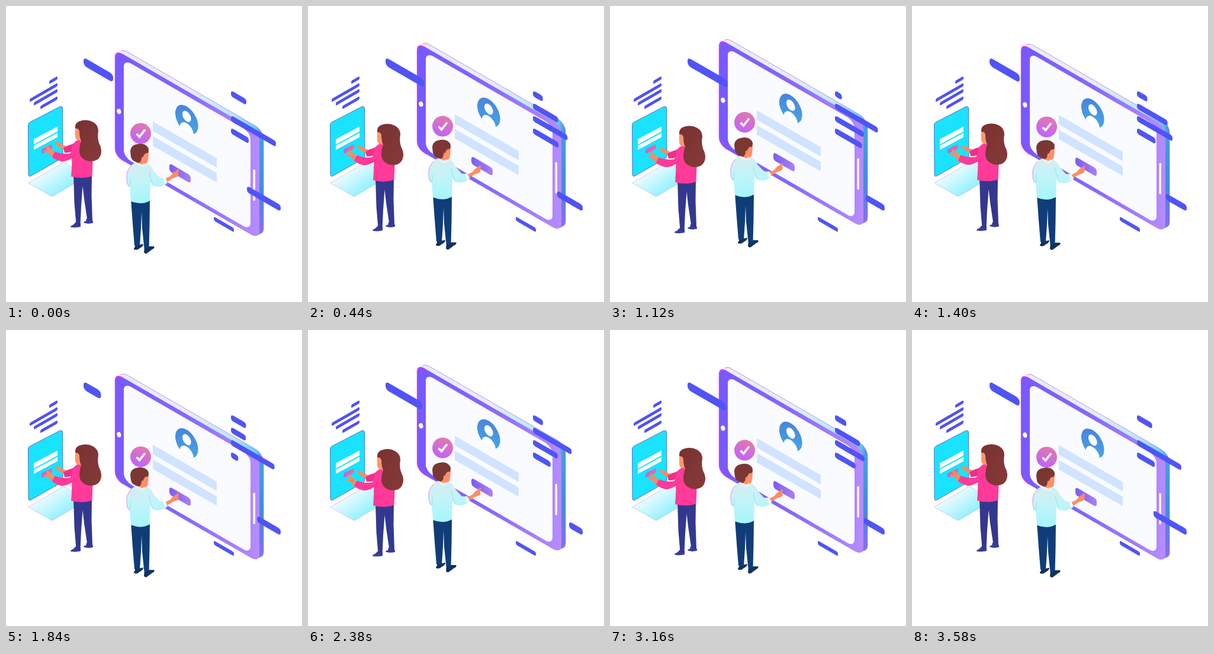
Write an HTML page that moves like this. It is 500 px wide and 500 px high and loops after 3600 ms.

```html
<!DOCTYPE html>
<html lang="en">
<head>
<meta charset="utf-8">
<title>Isometric sign-in</title>
<style>
html, body { margin: 0; width: 100%; height: 100%; overflow: hidden; background: #fff; }
svg { display: block; width: 100vw; height: 100vh; }
</style>
</head>
<body>
<svg viewBox="0 0 500 500">
  <defs>
    <linearGradient id="face"><stop offset="0" stop-color="#7858ff"/><stop offset=".5" stop-color="#8667ff"/><stop offset="1" stop-color="#b78cff"/></linearGradient>
    <linearGradient id="rim" gradientUnits="userSpaceOnUse" x1="184" x2="435" y1="0" y2="0">
      <stop offset="0" stop-color="#e9edf5"/><stop offset=".5" stop-color="#e4eef7"/><stop offset=".8" stop-color="#b5e9f5"/><stop offset=".95" stop-color="#62cdee"/><stop offset="1" stop-color="#4586dc"/>
    </linearGradient>
    <linearGradient id="edge" x2="0" y2="1"><stop offset="0" stop-color="#43a2e0"/><stop offset=".55" stop-color="#458bdc"/><stop offset="1" stop-color="#8a6cf2"/></linearGradient>
    <linearGradient id="button"><stop offset="0" stop-color="#7b5cf5"/><stop offset="1" stop-color="#ac80f0"/></linearGradient>
    <linearGradient id="badge" x1=".7" y1="0" x2=".3" y2="1"><stop offset="0" stop-color="#e678ab"/><stop offset="1" stop-color="#bd62ff"/></linearGradient>
    <linearGradient id="avatar" x2=".4" y2="1"><stop offset="0" stop-color="#4a7fdc"/><stop offset="1" stop-color="#45a4e4"/></linearGradient>
    <linearGradient id="keys" gradientUnits="userSpaceOnUse" x1="62" y1="280" x2="88" y2="318"><stop offset="0" stop-color="#f1fbff"/><stop offset="1" stop-color="#93f1ff"/></linearGradient>
    <linearGradient id="send"><stop offset="0" stop-color="#b56bdc"/><stop offset="1" stop-color="#ee6a9c"/></linearGradient>
    <linearGradient id="shirt" x2=".15" y2="1"><stop offset="0" stop-color="#dcebef"/><stop offset=".5" stop-color="#c2f4f9"/><stop offset="1" stop-color="#a6f6fc"/></linearGradient>
    <linearGradient id="hair" x2="1" y2="1"><stop offset="0" stop-color="#783232"/><stop offset="1" stop-color="#863a38"/></linearGradient>
    <clipPath id="disc"><circle r="22.5"/></clipPath>
  </defs>

  <g id="notes" fill="#5052f2"></g>

  <g id="laptop">
    <path d="M38 299L97 264L137 287L78 322Z" fill="url(#keys)" stroke="#b9b4f5" stroke-width=".7"/>
    <path d="M37.500 201Q37.500 198 40 196.500L90 170.500Q95 168 95.500 173L96 253Q96 256 93 258L42 287Q38 289 38 285Z" fill="#19e3ff" stroke="#5a6cc8" stroke-width="1"/>
    <path d="M47 225L87 203.500V212L47 234ZM47 236L87 214.500V221.500L47 243Z" fill="#fff"/>
    <rect width="18" height="8" rx="3" transform="matrix(1 -.5 0 1 60 242)" fill="url(#send)"/>
  </g>

  <g id="phone">
    <g id="shell"></g>
    <path d="M424 220L435 226V374Q435 379 432 382L425 386L418 380Z" fill="url(#edge)"/>
    <g transform="matrix(1 .577 0 1 184 73.500)">
      <rect width="244" height="180" rx="14" fill="url(#face)"/>
      <path d="M14 .5Q.5 .5 .5 14V166Q.5 179 14 179.500" fill="none" stroke="#f72cf0" stroke-width="1.300"/>
      <rect x="15" y="8" width="214" height="165" rx="12" fill="#f9fbff"/>
    </g>
    <ellipse cx="190.800" cy="178" rx="3.500" ry="4.500" fill="#fff" transform="rotate(-18 190.800 178)"/>
    <rect x="417.500" y="276" width="3.500" height="53" rx="1.700" fill="#fff"/>
    <path d="M248 195L356 257.300V273L248 211ZM248 220L356 282.300V298L248 236Z" fill="#d0e3ff"/>
    <g transform="matrix(.866 .5 0 1 305.300 192)">
      <g clip-path="url(#disc)">
        <circle r="22.500" fill="url(#avatar)"/>
        <circle cy="-5.500" r="8.500" fill="#fff"/>
        <ellipse cy="19" rx="13.500" ry="13" fill="#fff"/>
      </g>
    </g>
    <circle cx="227.500" cy="215.300" r="17.500" fill="url(#badge)"/>
    <path d="M220.500 216L225.500 221L235 209" fill="none" stroke="#fff" stroke-width="3.600"/>
    <rect width="36" height="13.500" rx="4.500" transform="matrix(1 .577 0 1 276 265.500)" fill="url(#button)"/>
  </g>

  <g id="bars" fill="#5054f6"></g>

  <g id="woman">
    <g fill="#393b9e">
      <path d="M118 365L126 367V373Q118 375 109 373.500Q109 371 113 370Z"/>
      <path d="M136 359L144 360L147 364V366.500Q139 369 131 366Q131 364 135 363.500Z"/>
    </g>
    <path d="M114 284H145L144.500 320L146 363H137.500L132 326L129.500 304L127 338L125.500 370L118.500 369L115.500 333Z" fill="#33388f"/>
    <path d="M83 231Q84 228 88 230L95 234L108 239L105 246L95 241Q86 237 83 231Z" fill="#ff8a5f"/>
    <path d="M120 229Q112 234 104 236L97 240L99 248Q112 248 124 240Z" fill="#ed2f8c"/>
    <path d="M110 288Q112 264 111 247Q110 231 122 226L136 222Q149 229 147 251L145.500 287Q130 293 110 288Z" fill="#ff3a98"/>
    <path d="M67 238Q70 235 73 239L82 247L86 252L80 258L72 248L66 247Q63 246 65 244L70 243Z" fill="#ff8a5f"/>
    <path d="M121 230Q114 235 112 244L108 249Q95 251 83 246Q80 249 78 255Q87 263 98 262Q112 259 120 250Z" fill="#ff3a98"/>
    <path d="M118 250Q104 264 92 262" fill="none" stroke="#df267f" stroke-width=".8"/>
    <path d="M118 202Q116 212 117 221Q118 228 125 227L130 232L136 223L130 202Z" fill="#ff966d"/>
    <path d="M117 207Q116 198 123 195Q136 190 147 196Q156 201 156 211Q154 221 157 231Q164 244 159 254Q154 264 139 262Q125 258 124 246Q124 236 127 228Q124 222 124 212Q123 206 117 207Z" fill="url(#hair)"/>
  </g>

  <g id="man">
    <g fill="#12325f">
      <path d="M218 402L227 403L232 402Q232 406 226 409Q221 414 216 411Q216 408 218 407Z"/>
      <path d="M234 406L243 406L250 406Q252 409 247 411L239 417Q235 420 233 416Z"/>
    </g>
    <path d="M211 326H243L242.500 370L241.500 409H233.500L230 375L229 348L228 375L226 405H217L214 368Z" fill="#103d78"/>
    <path d="M268 292L278 287Q282 281 287 279Q291 274 292 277L291 282Q293 287 288 289Q281 290 272 298Z" fill="#ff8c64"/>
    <path d="M204 292Q202 280 212 269Q217 264 226 262L238 266Q247 270 249 278L260 290L268 290L272 300Q260 308 249 304L244 298L243 329Q229 337 211 330L209 305Q204 303 204 292Z" fill="url(#shirt)"/>
    <path d="M209 305Q204 303 204 292Q202 280 212 269" fill="none" stroke="#d884f2" stroke-width=".9"/>
    <path d="M242 280Q243 290 249 304M209 305Q211 297 210 291" fill="none" stroke="#8adfeb" stroke-width=".8"/>
    <path d="M265 291L269 289.500L273 298L269 301Z" fill="#e9fcff"/>
    <path d="M222 257L236 244L241 246Q241 256 239 264Q237 267 232 266L231 269L220 265Z" fill="#ff8f68"/>
    <path d="M220 264L231 268L234 267L236 270L230 272Q223 270 218 266Z" fill="#e4f3f6"/>
    <path d="M210 246Q210 235 223 233Q234 231 240 239Q242 243 240 248L235 249Q232 252 231 257Q228 258 228 262L225 265Q213 263 211 255Z" fill="#7b3733"/>
    <ellipse cx="230.500" cy="257.500" rx="1.800" ry="2.600" fill="#ff8f68"/>
  </g>
</svg>
<script>
const LOOP = 3600, SLOPE = 0.577;
const el = id => document.getElementById(id);

function rect(parent, h, rx) {
  const r = document.createElementNS("http://www.w3.org/2000/svg", "rect");
  r.setAttribute("height", h);
  r.setAttribute("rx", rx);
  return parent.appendChild(r);
}

function place(r, x, y, w, slope = SLOPE) {
  r.setAttribute("width", Math.max(0, w));
  r.setAttribute("transform", `matrix(1 ${slope} 0 1 ${x} ${y})`);
}

// Linear track: evenly spaced keys, wrapping round
function track(keys, t) {
  const p = t / LOOP * keys.length, i = Math.floor(p);
  const a = keys[i % keys.length], b = keys[(i + 1) % keys.length];
  return a + (b - a) * (p - i);
}

// Phone thickness, with a fine line round the back
for (let d = 7; d > 0; d--) {
  const r = rect(el("shell"), 180, 14);
  r.setAttribute("fill", "url(#rim)");
  if (d === 7) r.setAttribute("stroke", "#c48af0");
  r.setAttribute("x", 184 + d);
  place(r, 0, 73.5 - d * 4 / 7 - (184 + d) * SLOPE, 244);
}

// Fixed lines above the laptop and under the phone
[[73, 126.5, 14], [40, 157, 47], [47, 163, 40], [58, 169, 29]]
  .forEach(([x, y, w]) => place(rect(el("notes"), 5.5, 2), x, y, w, -SLOPE));
place(rect(el("bars"), 7, 2.5), 351, 355.5, 34);

// Bars that grow from a fixed left end: x, y, height, keys of the right end
const bars = [
  [131, 86.5, 14, [181, 212, 158, 212]],
  [380, 142.5, 10, [406, 387, 406, 392]],
  [380, 163.5, 10, [378, 469, 402, 469]],
  [380, 184.5, 10, [456, 420, 456, 403]],
  [380, 205.5, 10, [410, 437, 391, 420]]
].map(([x, y, h, ends]) => ({ x, y, ends, r: rect(el("bars"), h, h * 0.4) }));

// This one grows from its right end
const tail = rect(el("bars"), 11, 4.5);
const tailKeys = [407, 435, 423, 451];

function lift(id, dy, t) {
  el(id).setAttribute("transform", `translate(0 ${track([0, dy, 0, dy], t)})`);
}

function draw(t) {
  lift("phone", -25, t);
  lift("man", -14, t);
  lift("woman", 13, t);
  for (const b of bars) place(b.r, b.x, b.y, track(b.ends, t) - b.x);
  const x = track(tailKeys, t);
  place(tail, x, 303.5 + (x - 407) * SLOPE, 464 - x);
}

function tick() {
  draw(performance.now() % LOOP);
  requestAnimationFrame(tick);
}
tick();
</script>
</body>
</html>
```
